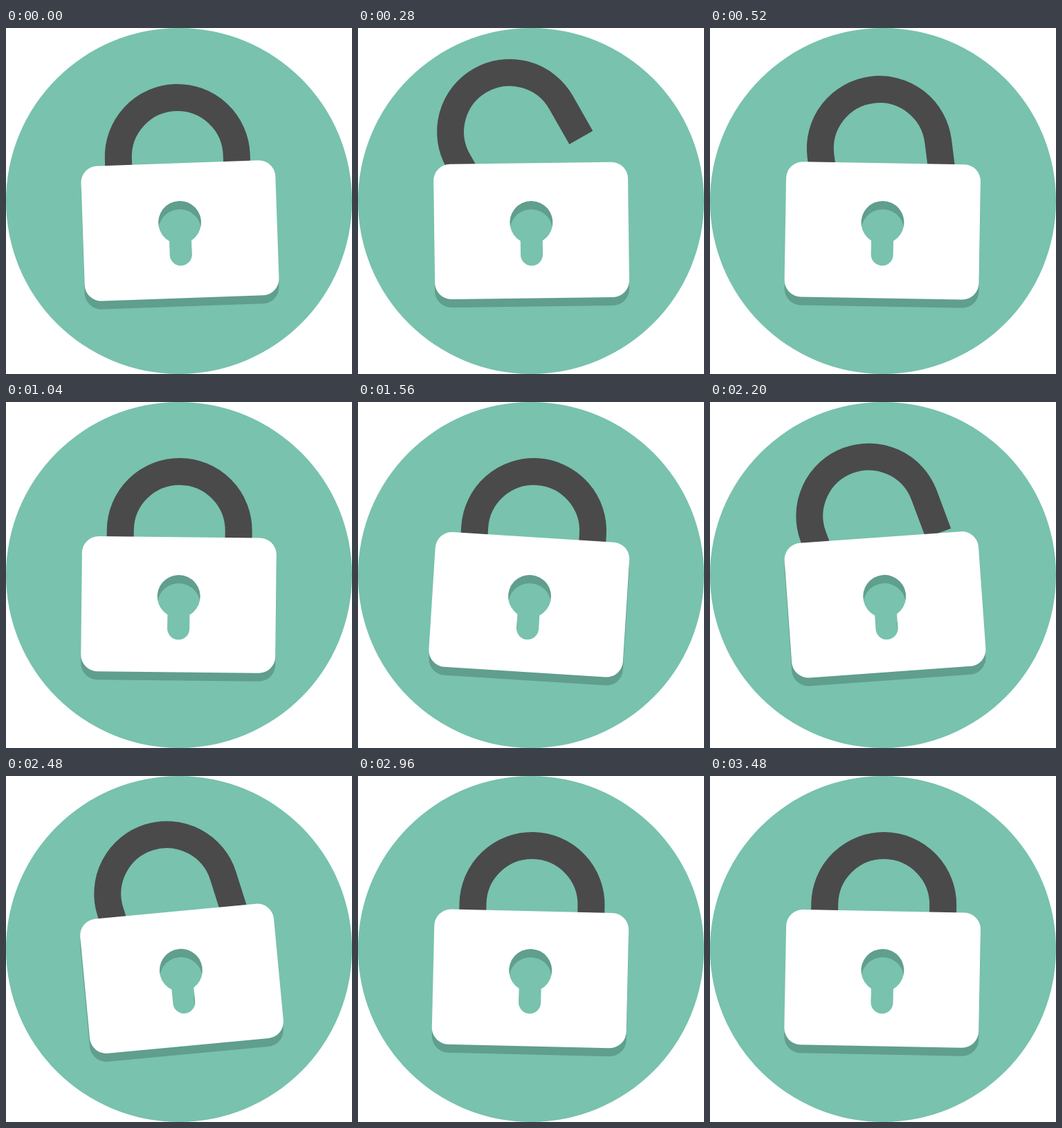
Write an HTML page that moves like this. It is 500 by 500 pixels and loops after 3.52 s.

```html
<!DOCTYPE html>
<html lang="en">
<head>
<meta charset="utf-8">
<title>Padlock</title>
<style>
  html, body { margin: 0; width: 100%; height: 100%; overflow: hidden; background: #fff; }
  svg { display: block; width: 100%; height: 100%; }
</style>
</head>
<body>
<svg viewBox="0 0 500 500">
  <defs>
    <path id="plate" fill-rule="evenodd" d="M133.5 195.3H366.5a24 24 0 0 1 24 24V366.5a24 24 0 0 1 -24 24H133.5a24 24 0 0 1 -24 -24V219.3a24 24 0 0 1 24 -24Z
      M234 307.5A31 31 0 1 1 266 307.5V327.5A16 16 0 0 1 234 327.5Z"/>
  </defs>
  <circle cx="250" cy="250" r="250" fill="#78c2ae"/>
  <path id="shackle" d="M164.5 244.5V186a85.5 85.5 0 0 1 171 0V244.5" fill="none" stroke="#4a4a4a" stroke-width="39"/>
  <use id="shadow" href="#plate" fill="#609e8d"/>
  <use id="body" href="#plate" fill="#fff"/>
</svg>
<script>
const LOOP = 3520, STEP = 40;
const OPEN_START = 52, OPEN_EVERY = 2003, RISE = 285, FALL = 420, MAX_LIFT = 32;

// Turning points of the sway: [ms, degrees]
const turns = [[0, -2], [680, 1.4], [1000, 0.6], [1760, 4.2], [2365, -5.8], [3160, 2.6], [3800, -0.4]];

const ease = u => (1 - Math.cos(Math.PI * u)) / 2;

function sway(t) {
  const i = turns.findIndex(([time]) => time > t);
  const [t0, a0] = turns[i - 1], [t1, a1] = turns[i];
  return a0 + (a1 - a0) * ease((t - t0) / (t1 - t0));
}

function lift(t) {
  const local = (t - OPEN_START + OPEN_EVERY) % OPEN_EVERY;
  if (local < RISE) return MAX_LIFT * ease(local / RISE);
  return MAX_LIFT * Math.max(0, 1 - (local - RISE) / FALL) ** 2.38;
}

const [shackle, shadow, body] = ['shackle', 'shadow', 'body'].map(id => document.getElementById(id));

function draw(now) {
  const t = Math.floor(now % LOOP / STEP) * STEP;
  const tilt = `rotate(${sway(t)} 250 250)`;
  body.setAttribute('transform', tilt);
  shadow.setAttribute('transform', 'translate(0 12) ' + tilt);
  shackle.setAttribute('transform', `${tilt} rotate(${-lift(t)} 164.5 225)`);
}

const start = performance.now();
function tick() {
  draw(performance.now() - start);
  requestAnimationFrame(tick);
}
tick();
</script>
</body>
</html>
```
